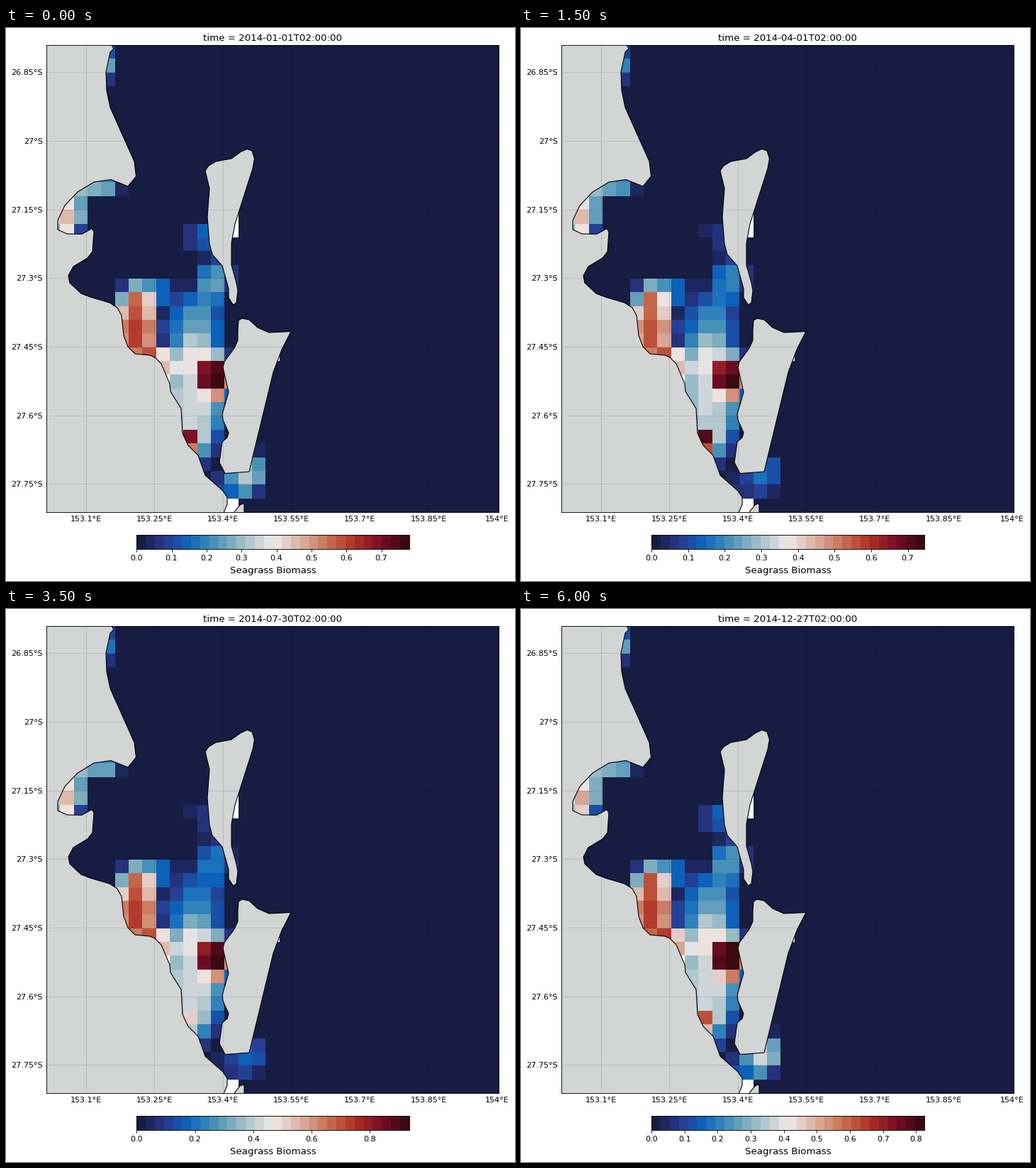
A matplotlib script that plays this animation: 718x779 px, repeating every 6.5 s.

```python
import numpy as np
import matplotlib.pyplot as plt
from matplotlib.animation import FuncAnimation
from matplotlib.colors import LinearSegmentedColormap

W, H, DPI = 718, 779, 80
ROWS, COLS, CELL = 34, 33, 58 / 3
LEFT, TOP = 57.1, 24.3
RIGHT, BOTTOM = LEFT + COLS * CELL, TOP + ROWS * CELL
CELL_DEG, WEST, NORTH = .03, 153.0138, 26.791
LAND = "#d3d5d4"
STEPS = 13

# Upper colour limit of every 30-day step
VMAX = [.78, .857, 1.052, .7455, .95, .932, .91,
        .935, .934, 1.001, .934, .869, .825]

# Seasonal rhythm: mean, swing, step of the peak
BANK = (1.16, .18, 8.7)
CHANNEL = (1.03, .16, 10.7)
INLET = (.9, .5, 11.3)
SHOAL = (.8, .5, 2)

# Seagrass patches: column, row, radii, height, rhythm
PATCHES = [
    (4, .95, .8, 1, .28, CHANNEL),
    (.7, 12.2, 1, 2, .52, BANK),
    (1.9, 11.3, .8, 1.7, .3, BANK),
    (3.3, 9.6, 1.5, 1.1, .32, BANK),
    (6, 20.3, 1.65, 3, .72, BANK),
    (7, 17.5, 1.8, 1.1, .22, BANK),
    (7.8, 22.6, 1.2, 1, .5, BANK),
    (10.4, 20.2, 1.9, 2.8, .27, CHANNEL),
    (11.8, 16.6, 1.2, 1.7, .27, CHANNEL),
    (10.9, 13.4, 1.1, 1.1, .14, INLET),
    (12.1, 23.6, 1.4, 1.5, .75, BANK),
    (10.2, 25.5, 2.2, 4.3, .42, BANK),
    (10, 28.4, .9, .9, .45, SHOAL),
    (14.2, 30.6, 1.3, 1.5, .32, INLET),
    (12.7, 31.9, 1.6, 1.2, .12, INLET),
]
NO_DATA = [(12, 13), (13, 13), (22, 16), (24, 8), (33, 13)]

# Shorelines in stage pixels
MAINLAND = [
    (40, 10), (146, 10), (149, 24), (152, 29), (147, 34), (141, 62),
    (142, 88), (147, 112), (181, 188), (183.5, 209), (172, 223),
    (148, 213.5), (124, 217), (101, 231), (83, 250), (73, 271), (73, 284),
    (86, 290), (107, 290.3), (121, 282.5), (124, 287), (122, 315),
    (115, 324), (95, 336), (88, 349), (90, 359), (106, 374), (119, 379),
    (146, 387), (157, 394), (163, 405), (166, 433), (172, 449), (182, 459),
    (203, 461), (210, 464), (219, 473), (231, 501), (232, 512), (247, 536),
    (249, 571), (257, 588), (271, 602), (281, 630), (306, 652), (312, 661),
    (312, 671), (300, 700), (40, 700)]
NORTH_ISLAND = [
    (281, 201), (286, 194), (296, 188), (318, 184), (331, 174.5),
    (340, 170.5), (347, 173), (350.5, 184), (348, 198), (323, 276),
    (318, 303), (318, 334), (325, 359), (327, 370), (325, 387),
    (320.5, 390), (314, 380), (314, 367), (305, 335), (291, 319),
    (287, 304), (284, 266), (287, 226)]
SOUTH_ISLAND = [
    (328, 412), (333, 409), (343, 411), (355, 422), (371, 429),
    (402, 427.5), (389, 453), (377, 485), (343, 625), (309, 627.5),
    (301, 612), (305, 583), (312, 577), (314, 570), (306, 552), (305, 544),
    (314, 513), (306, 478), (308, 470), (322, 451), (327, 440), (327, 425)]
ISLET = [(318, 690), (322, 682), (330, 672), (334, 670), (336, 671),
         (336, 690)]


def balance_map(levels=30):
    """Diverging navy - white - dark red map."""
    names = ["#171c42", "#293a8f", "#0b66bd", "#4590b9", "#8eb5c2", "#d2d8db",
             "#e6d2cc", "#d59d89", "#c46548", "#ac2b24", "#780e28", "#3c0911"]
    stops = list(zip(np.linspace(0, 1, len(names)), names))
    stops.insert(len(names) // 2, (.5, "#f1eceb"))
    cmap = LinearSegmentedColormap.from_list("balance", stops, N=levels)
    cmap.set_bad("white")
    return cmap


def season(step, mean, swing, peak):
    return mean + swing * np.cos(2 * np.pi * (step - peak) / STEPS)


def field(step):
    """Biomass relative to the colour limit of this step."""
    row, col = np.mgrid[:ROWS, :COLS]
    grid = np.zeros((ROWS, COLS))
    for x, y, rx, ry, height, rhythm in PATCHES:
        dist2 = ((col - x) / rx) ** 2 + ((row - y) / ry) ** 2
        grid += height * season(step, *rhythm) * np.exp(-dist2 ** 2)
    grid = np.clip(grid * VMAX[0] / VMAX[step], 0, 1)
    for cell in NO_DATA:
        grid[cell] = np.nan
    return np.ma.masked_invalid(grid)


def add_axes(left, top, right, bottom):
    return fig.add_axes([left / W, 1 - bottom / H,
                         (right - left) / W, (bottom - top) / H])


plt.rcParams["font.family"] = "DejaVu Sans"
fig = plt.figure(figsize=(W / DPI, H / DPI), dpi=DPI, facecolor="white")
cmap = balance_map()

ax = add_axes(LEFT, TOP, RIGHT, BOTTOM)
image = ax.imshow(field(0), cmap=cmap, vmin=0, vmax=1, aspect="auto",
                  interpolation="nearest", extent=(LEFT, RIGHT, BOTTOM, TOP))
for shore in (MAINLAND, NORTH_ISLAND, SOUTH_ISLAND, ISLET):
    ax.fill(*zip(*shore), facecolor=LAND, edgecolor="black", lw=1)
ax.set_xlim(LEFT, RIGHT)
ax.set_ylim(BOTTOM, TOP)

lons = np.round(153.1 + .15 * np.arange(7), 2)
lats = np.round(26.85 + .15 * np.arange(7), 2)
ax.set_xticks(LEFT + (lons - WEST) / CELL_DEG * CELL,
              [f"{v:g}°E" for v in lons])
ax.set_yticks(TOP + (lats - NORTH) / CELL_DEG * CELL,
              [f"{v:g}°S" for v in lats])
ax.tick_params(length=0, pad=5)
ax.set_axisbelow(False)
ax.grid(color="black", alpha=.13, lw=.8)
title = ax.set_title("", fontsize=12)

cax = add_axes(184.2, 714, 569, 734.3)
ramp = cax.imshow(np.linspace(0, 1, 385)[None], cmap=cmap, aspect="auto",
                  interpolation="nearest", extent=(0, 1, 0, 1))
cax.set_yticks([])
cax.set_xlabel("Seagrass Biomass", fontsize=12, labelpad=5)

start = np.datetime64("2014-01-01T02:00:00")


def draw(step):
    image.set_data(field(step))
    title.set_text(f"time = {start + np.timedelta64(30 * step, 'D')}")
    ramp.set_extent((0, VMAX[step], 0, 1))
    cax.set_xlim(0, VMAX[step])
    return image, title, ramp


anim = FuncAnimation(fig, draw, frames=STEPS, interval=500,
                     init_func=lambda: draw(0), repeat=True, repeat_delay=0)
plt.show()
```
